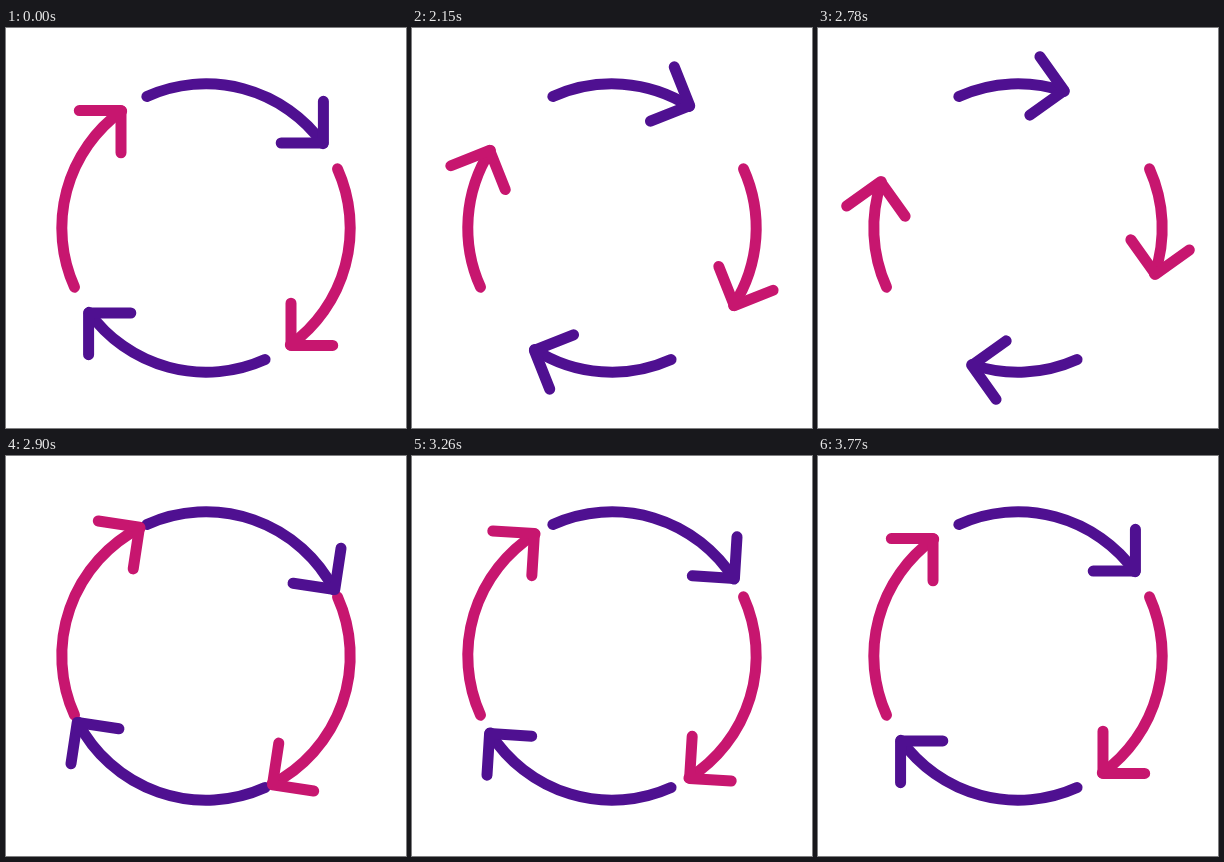
Write an HTML page with a canvas that moves like this. It is 400 px wide and 400 px high and loops after 3830 ms.

```html
<!DOCTYPE html>
<html lang="en">
<head>
<meta charset="utf-8">
<title>Cycle arrows</title>
<style>
  html, body { margin: 0; width: 100%; height: 100%; overflow: hidden; background: #fff; }
  canvas { display: block; width: 400px; height: 400px; }
</style>
</head>
<body>
<canvas width="400" height="400"></canvas>
<script>
const ctx = document.querySelector('canvas').getContext('2d');
const LOOP = 3830, REST = 2000, STEP = 30;
const RADIUS = 144.2, TAIL = -24.2, TIP = 54.2; // degrees clockwise from the top
const BACK = -54, OVER = 8.6;                   // swing either side of rest
const COLORS = ['#4f1091', '#c7166f'];

const rad = deg => deg * Math.PI / 180;
const easeOut = x => Math.sin(x * Math.PI / 2);

// Swing of the arrowheads in degrees: pull back, snap forward, settle.
function swing(ms) {
  const k = Math.min(59, Math.floor(Math.max(0, ms - REST) / STEP));
  if (k < 19) return BACK * easeOut(k / 19);
  if (k < 30) return BACK + (OVER - BACK) * ((k - 19) / 11) ** 2.7;
  return OVER * (1 - easeOut((k - 30) / 30));
}

function stroke(turn, color, trace) {
  ctx.save();
  ctx.translate(200, 200);
  ctx.rotate(rad(turn));
  ctx.strokeStyle = color;
  ctx.beginPath();
  trace();
  ctx.stroke();
  ctx.restore();
}

function draw(now) {
  const angle = swing(now % LOOP);
  ctx.fillStyle = '#fff';
  ctx.fillRect(0, 0, 400, 400);
  ctx.lineWidth = 11;
  ctx.lineCap = ctx.lineJoin = 'round';
  for (let i = 0; i < 4; i++) {
    stroke(i * 90, COLORS[i % 2], () =>
      ctx.arc(0, 0, RADIUS, rad(TAIL - 90), rad(TIP + angle - 90)));
  }
  for (let i = 0; i < 4; i++) {
    stroke(i * 90 + angle, COLORS[i % 2], () => {
      ctx.moveTo(117.4, -126.7);
      ctx.lineTo(117.4, -85);
      ctx.lineTo(75.2, -85);
    });
  }
}

const start = performance.now();
function tick() {
  draw(performance.now() - start);
  requestAnimationFrame(tick);
}
tick();
</script>
</body>
</html>
```
